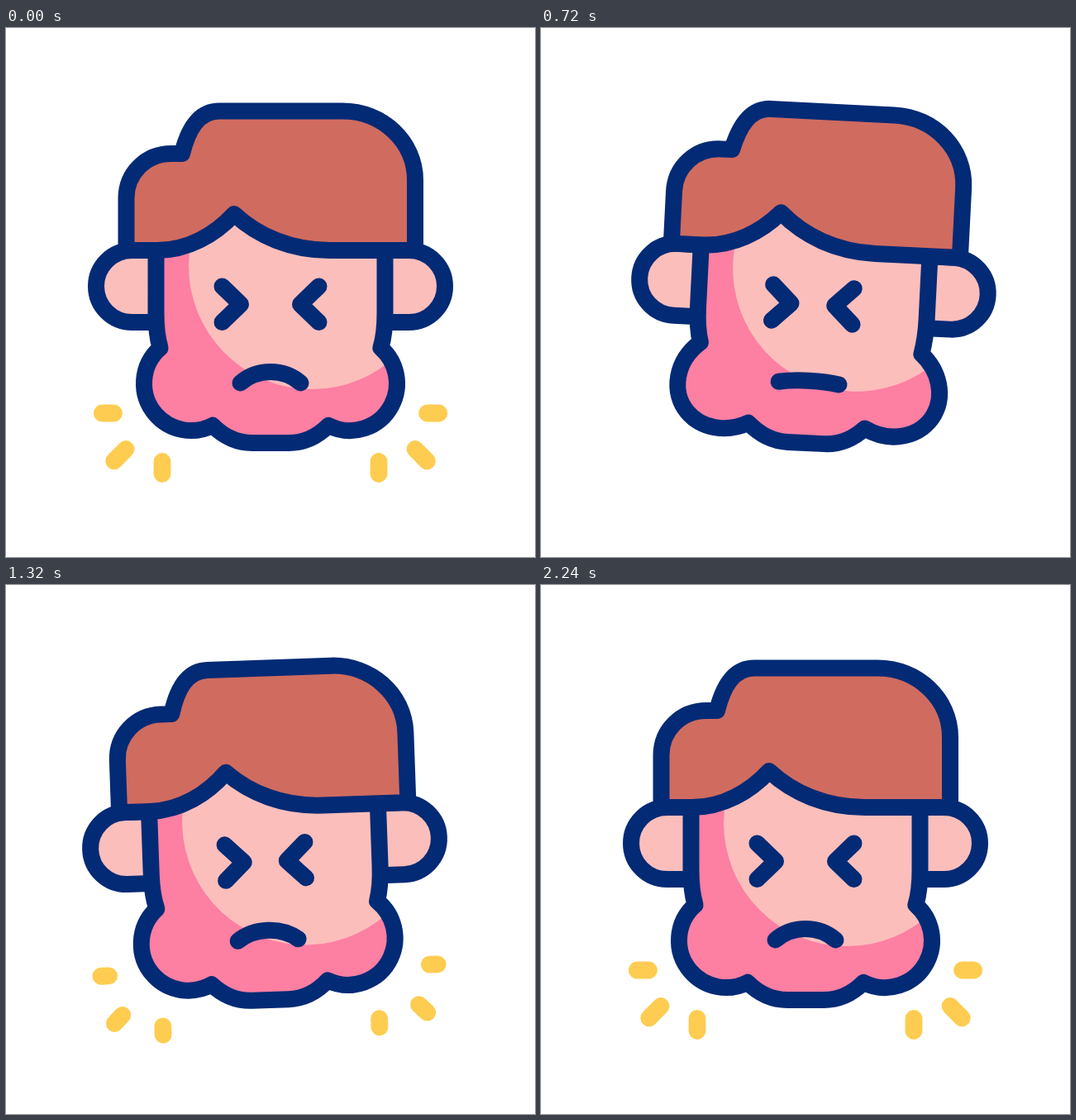
These frames come from a looping animation (640 by 640 pixels, 2400 ms). An HTML page with a canvas:

```html
<!DOCTYPE html>
<html lang="en">
<head>
<meta charset="utf-8">
<title>Swollen face</title>
<style>
  html, body { margin: 0; width: 100%; height: 100%; overflow: hidden; background: #fff; }
  canvas { display: block; width: 100vmin; height: 100vmin; }
</style>
</head>
<body>
<canvas id="stage" width="640" height="640"></canvas>
<script>
const ctx = document.getElementById('stage').getContext('2d');
const NAVY = '#032a75', HAIR = '#d06b5f', SKIN = '#fcbebb', PINK = '#fd7fa2', YELLOW = '#fecc50';
const LOOP = 2400, START = 200, END = 2240, PULSE = (END - START) / 2;
const RIGHT = 795, LEFT = 1508; // times of the two head-tilt extremes
const rad = deg => deg * Math.PI / 180;

// Eased progress from time a to time b
function ease(t, a, b) {
  const u = Math.min(1, Math.max(0, (t - a) / (b - a)));
  return (1 - Math.cos(Math.PI * u)) / 2;
}

function pose(t) {
  const into = ease(t, START, RIGHT), swing = ease(t, RIGHT, LEFT), back = ease(t, LEFT, END);
  const p = (t - START) % PULSE;
  const moving = t > START && t < END;
  return {
    tilt: 3 * into - 6 * swing + 3 * back,
    squeeze: 10 * (into - back),
    frown: 13.5 - 11 * (into - swing),
    swell: moving ? 7.6 * (1 - Math.cos(2 * Math.PI * p / PULSE)) / 2 : 0,
    rayFrom: moving && p < 600 ? ease(p, 0, 265) : 0,
    rayTo: moving && p > 600 ? ease(p, PULSE - 325, PULSE) : 1
  };
}

function outline(path, width = 20, color = NAVY) {
  ctx.lineWidth = width;
  ctx.strokeStyle = color;
  ctx.stroke(path);
}

function fill(path, color) {
  ctx.fillStyle = color;
  ctx.fill(path);
}

function mirrored(draw) {
  draw();
  ctx.save();
  ctx.translate(640, 0);
  ctx.scale(-1, 1);
  draw();
  ctx.restore();
}

const ear = new Path2D('M181.5 269H152.5A43.5 43.5 0 0 0 152.5 356H181.5');
const hair = new Path2D(`M145.5 269V206C145.5 176 169 152 200 152H213
  C220 124 232 100.5 258 100.5H407C456 100.5 495 138 495 184V269
  H392C345 269 305 252 276 225C253 250 220 269 183 269Z`);
const skin = new Path2D();
skin.arc(370, 288, 149, 0, 2 * Math.PI);

function facePath(swell) {
  const p = new Path2D();
  p.moveTo(181.5, 269);
  p.lineTo(181.5, 345);
  p.bezierCurveTo(181.5, 362, 183, 375, 186.6, 387);
  p.ellipse(224, 430, 57 + swell, 57, rad(148), rad(81), rad(-85), true);
  p.bezierCurveTo(264, 495, 280, 502, 298, 502);
  p.lineTo(342, 502);
  p.bezierCurveTo(360, 502, 376, 495, 390, 481);
  p.ellipse(416, 430, 57 + swell, 57, rad(32), rad(85), rad(-81), true);
  p.bezierCurveTo(457, 375, 458.5, 362, 458.5, 345);
  p.lineTo(458.5, 269);
  return p;
}

function drawFace({ swell, squeeze, frown }) {
  const face = facePath(swell);
  const inside = new Path2D(face);
  inside.lineTo(276, 225);
  inside.closePath();
  fill(inside, PINK);
  ctx.save();
  ctx.clip(inside);
  fill(skin, SKIN);
  ctx.restore();
  outline(face);
  fill(hair, HAIR);
  outline(hair);

  const x = 261.5 + squeeze;
  const eye = new Path2D(`M${x} 312.5L${x + 22.5} 334.3L${x} 356`);
  mirrored(() => outline(eye));

  const top = 429.5 - frown * 4 / 3;
  outline(new Path2D(`M283.5 429.5C304 ${top} 336 ${top} 356.5 429.5`));
}

// Each ray: inner end, then outer end
const rays = [[130.5, 466, 116.2, 466], [145, 509.5, 130.7, 523.8], [189, 524.5, 189, 539.5]];

function drawRays({ rayFrom, rayTo }) {
  if (rayTo - rayFrom < 0.0005) return;
  for (const [x, y, ex, ey] of rays) {
    const at = u => `${x + (ex - x) * u} ${y + (ey - y) * u}`;
    const ray = new Path2D(`M${at(rayFrom)}L${at(rayTo)}`);
    mirrored(() => outline(ray, 20.8, YELLOW));
  }
}

function draw(t) {
  const p = pose(t);
  ctx.fillStyle = '#fff';
  ctx.fillRect(0, 0, 640, 640);
  ctx.lineCap = ctx.lineJoin = 'round';
  ctx.save();
  ctx.translate(320, 510);
  ctx.rotate(rad(p.tilt));
  ctx.translate(-320, -510);
  drawRays(p);
  mirrored(() => {
    fill(ear, SKIN);
    outline(ear);
  });
  drawFace(p);
  ctx.restore();
}

const began = performance.now();
function tick() {
  const t = (performance.now() - began) % LOOP;
  draw(Math.floor(t / 20) * 20);
  requestAnimationFrame(tick);
}
tick();
</script>
</body>
</html>
```
